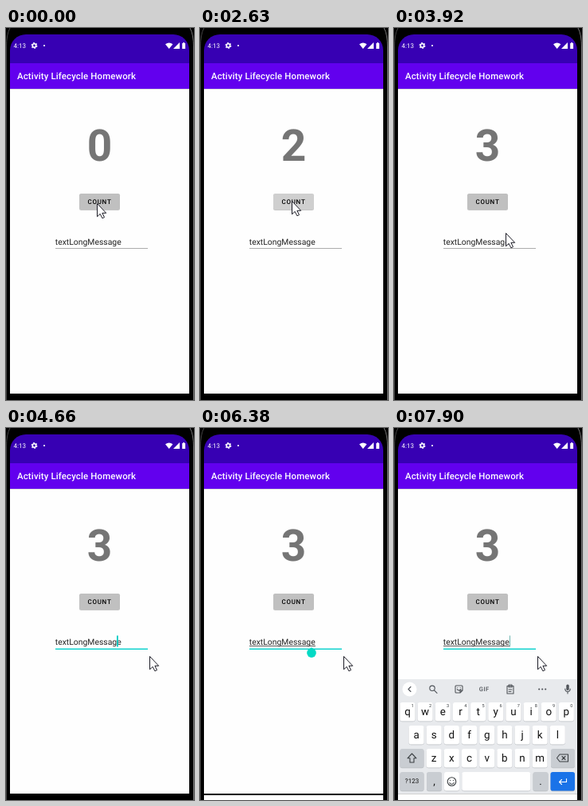
Write an HTML page that moves like this. It is 236x465 px and loops after 8 s.

```html
<!DOCTYPE html>
<html lang="en">
<head>
<meta charset="utf-8">
<title>Activity Lifecycle Homework</title>
<style>
html, body { margin: 0; width: 100%; height: 100%; overflow: hidden; background: #000; }
svg { display: block; }
text { font-family: Roboto, sans-serif; text-rendering: geometricPrecision; }
.mid { text-anchor: middle; }
.line { fill: none; stroke: #50545a; stroke-width: 1.1; stroke-linecap: round; stroke-linejoin: round; }

.step { animation: 8s step-end infinite; }
#digits { animation-name: digits; }
#face { animation-name: face; }
#lift { animation-name: lift; }
#focus { animation-name: focus; }
#caret { animation-name: caret; }
#endCaret { animation-name: endCaret; }
#handle { animation-name: handle; }
#compose { animation-name: compose; }
#navSlide { animation-name: navSlide; }
#navLight { animation-name: navLight; }
#keyboard { animation-name: keyboard; }
#pointer { animation-name: pointer; }

@keyframes digits {
  0% { transform: translateY(0); }
  21.375% { transform: translateY(-70px); }
  32.875% { transform: translateY(-140px); }
  43%, 100% { transform: translateY(-210px); }
}
@keyframes face {
  0% { fill: #c0c0c0; }
  14.875% { fill: #cfcfcf; }
  43% { fill: #c8c8c8; }
  44.5%, 100% { fill: #c0c0c0; }
}
@keyframes lift {
  0% { opacity: 0; }
  14.875% { opacity: .3; }
  21.375%, 100% { opacity: 0; }
}
@keyframes focus {
  0% { opacity: 0; }
  53.5% { opacity: .55; }
  55%, 100% { opacity: 1; }
}
@keyframes caret {
  0% { opacity: 0; }
  55% { opacity: 1; }
  65% { opacity: 0; }
  66.5% { opacity: 1; }
  75.125% { opacity: 0; }
  84.5% { opacity: 1; }
  91%, 100% { opacity: 0; }
}
@keyframes endCaret {
  0% { opacity: 0; }
  94%, 100% { opacity: 1; }
}
@keyframes handle {
  0% { opacity: 0; }
  66.5% { opacity: .85; }
  69.75% { opacity: 1; }
  92.5%, 100% { opacity: 0; }
}
@keyframes compose {
  0% { opacity: 0; }
  76.625%, 100% { opacity: 1; }
}
@keyframes navSlide {
  0% { opacity: 0; }
  79.75%, 100% { opacity: 1; }
}
@keyframes navLight {
  0% { opacity: 0; }
  81.25%, 100% { opacity: 1; }
}
@keyframes keyboard {
  0% { opacity: 0; }
  98.75%, 100% { opacity: 1; }
}
@keyframes pointer {
  0% { transform: translate(114px, 219px); }
  1.5% { transform: translate(115px, 216px); }
  46% { transform: translate(119px, 224px); }
  47.5% { transform: translate(131px, 243px); }
  49% { transform: translate(140px, 256px); }
  50.5% { transform: translate(140px, 262px); }
  52% { transform: translate(140px, 264px); }
  55% { transform: translate(143px, 265px); }
  56.5% { transform: translate(159px, 271px); }
  58.25%, 100% { transform: translate(180px, 285px); }
}
</style>
</head>
<body>
<svg width="236" height="465" viewBox="0 0 236 465">
  <rect width="236" height="465"/>
  <path d="M.5 465V24Q.5 8 5 0" fill="none" stroke="#444"/>
  <path d="M235.5 465V24Q235.5 8 231 0" fill="none" stroke="#777"/>

  <!-- status and app bars -->
  <path d="M5 44V28A20 20 0 0 1 25 8H210A20 20 0 0 1 230 28V44Z" fill="#3700b3"/>
  <rect x="5" y="44" width="225" height="32" fill="#6200ee"/>
  <rect x="5" y="76" width="225" height="381" fill="#fefefe"/>
  <rect x="5" y="76" width="225" height="1" fill="#dcdcdc"/>
  <g fill="#fff">
    <text x="9.5" y="25" font-size="8">4:13</text>
    <circle cx="35.5" cy="22" r="2.2" fill="none" stroke="#fff" stroke-width="1.6"/>
    <circle cx="35.5" cy="22" r="3.4" fill="none" stroke="#fff" stroke-width="1.1" stroke-dasharray="1.78 1.78"/>
    <circle cx="48" cy="22" r="1.1"/>
    <path d="M200 20.2Q204.7 16.6 209.4 20.2L204.7 26Z"/>
    <path d="M218 18V26H210Z"/>
    <path d="M221.2 19H222.3V18H224V19H225.1V26H221.2Z"/>
    <text x="14" y="64.3" font-size="11.43" font-weight="500" letter-spacing=".143">Activity Lifecycle Homework</text>
  </g>

  <svg x="90" y="110" width="55" height="70">
    <g id="digits" class="step mid" font-size="55" font-weight="700" fill="#757575">
      <text x="27.5" y="55.5">0</text>
      <text x="27.5" y="125.5">1</text>
      <text x="27.5" y="195.5">2</text>
      <text x="27.5" y="265.5">3</text>
    </g>
  </svg>

  <!-- button -->
  <rect id="lift" class="step" x="91" y="209" width="53" height="21.5" rx="3" fill="#777"/>
  <rect x="92" y="207.5" width="51" height="20.5" rx="2.3" fill="#000" opacity=".22"/>
  <rect id="face" class="step" x="92" y="207" width="51" height="20" rx="2.3" fill="#c0c0c0"/>
  <text x="102.5" y="220.2" font-size="8" font-weight="500" letter-spacing=".714">COUNT</text>

  <!-- text field -->
  <text x="61.8" y="270.7" font-size="10.4" fill="#222">textLongMessage</text>
  <rect id="compose" class="step" x="62" y="272" width="83" height=".8" fill="#333"/>
  <rect x="62" y="275" width="116" height=".7" fill="#8a8a8a"/>
  <g id="focus" class="step">
    <rect x="62" y="275" width="116" height="1" fill="#fefefe"/>
    <rect x="62" y="275.6" width="116" height="1.4" fill="#03d0cb"/>
  </g>
  <rect id="caret" class="step" x="139" y="259.5" width="1.8" height="14" fill="#03cbc4"/>
  <rect id="endCaret" class="step" x="145" y="259.5" width="1" height="14" fill="#6fb5b0"/>
  <path id="handle" class="step" d="M140 274.2L144.2 277.1A5.8 5.8 0 1 1 135.8 277.1Z" fill="#03dac5"/>

  <!-- navigation strip -->
  <rect id="navSlide" class="step" x="5" y="459" width="225" height="6" fill="#fff"/>
  <g id="navLight" class="step">
    <rect x="5" y="457" width="225" height="8" fill="#fefefe"/>
    <rect x="5" y="457" width="225" height="1" fill="#d0d0d0"/>
  </g>

  <g id="keyboard" class="step">
    <rect x="5" y="314" width="225" height="143" fill="#e8eaed"/>
    <circle cx="19.5" cy="326.5" r="9" fill="#fff"/>
    <g class="line">
      <path d="M21 323.5L18 326.5L21 329.5"/>
      <circle cx="48" cy="325.3" r="3.2"/>
      <path d="M50.5 327.8L54 331.3"/>
      <path d="M78 322H85Q86 322 86 323V328L83 331H78Q77 331 77 330V323Q77 322 78 322ZM86 328H83V331M79.3 326.7Q81.5 329.4 83.7 326.7M79.8 324.5V324.6M83.2 324.5V324.6"/>
      <path d="M142 322.5H150V332H142ZM144 321H148V324H144ZM144 327H148M144 329.5H147"/>
      <path d="M214.8 326Q214.8 329.5 218 329.5T221.2 326M218 329.5V332"/>
    </g>
    <rect x="216.3" y="320.5" width="3.4" height="7.5" rx="1.7" fill="#50545a"/>
    <g fill="#50545a">
      <text class="mid" x="113.3" y="329.2" font-size="7.6" font-weight="500" letter-spacing=".5">GIF</text>
      <circle cx="182.2" cy="326.5" r="1.1"/><circle cx="186.2" cy="326.5" r="1.1"/><circle cx="190.2" cy="326.5" r="1.1"/>
    </g>
    <g id="keys"></g>
    <g class="line" style="stroke:#3c4043">
      <path d="M22.5 407L28 412.8H25V418H20V412.8H17Z"/>
      <path d="M204.5 412.5L208 408H218.5V417H208ZM211 410.5L215 414.5M215 410.5L211 414.5"/>
      <circle cx="72.5" cy="442" r="5.3"/>
      <path d="M69.8 443.5Q72.5 447 75.2 443.5M70.6 440.3V440.4M74.4 440.3V440.4"/>
      <path d="M216.5 438.5V442.5H207.5M210.5 439.5L207.5 442.5L210.5 445.5" style="stroke:#fff"/>
    </g>
  </g>

  <path id="pointer" class="step" d="M.5 .5V16.8L4.2 13.4L6.9 18.8L9.5 17.6L6.9 12.3H11.7Z" fill="#fff" stroke="#1c1c26" stroke-linejoin="round"/>
</svg>
<script>
const keys = document.getElementById('keys');
const PITCH = 22.15, WHITE = '#fff', GREY = '#c9cdd2';

function add(tag, attrs, text = '') {
  const el = document.createElementNS('http://www.w3.org/2000/svg', tag);
  for (const name in attrs) el.setAttribute(name, attrs[name]);
  el.textContent = text;
  keys.append(el);
}

function key(x, y, width, fill, label = '', size = 13.4) {
  add('rect', { x, y: y + .8, width, height: 23.5, rx: 2.8, fill: '#b9bcc1' });
  add('rect', { x, y, width, height: 23.5, rx: 2.8, fill });
  add('text', { x: x + width / 2, y: y + 11.2 + size * .34, class: 'mid', 'font-size': size, fill: '#111' }, label);
}

[['qwertyuiop', 17], ['asdfghjkl', 28.1], ['zxcvbnm', 50.2]].forEach(([letters, start], row) => {
  [...letters].forEach((letter, i) => {
    const x = start + i * PITCH, y = 343 + row * 29;
    key(x - 9.5, y, 19, WHITE, letter);
    if (row === 0) add('text', { x: x + 4.8, y: y + 6.4, 'font-size': 5.6, fill: '#3c4043' }, (i + 1) % 10);
  });
});
key(7.5, 401, 30, GREY);
key(197, 401, 30, GREY);
key(7.5, 430, 30, GREY, '?123', 8);
key(41, 430, 19, GREY, ',', 13);
key(63, 430, 19, WHITE);
key(85.3, 430, 86, WHITE);
key(174.5, 430, 19, GREY, '.', 13);
key(196.5, 430, 30.5, '#1a73e8');
</script>
</body>
</html>
```
